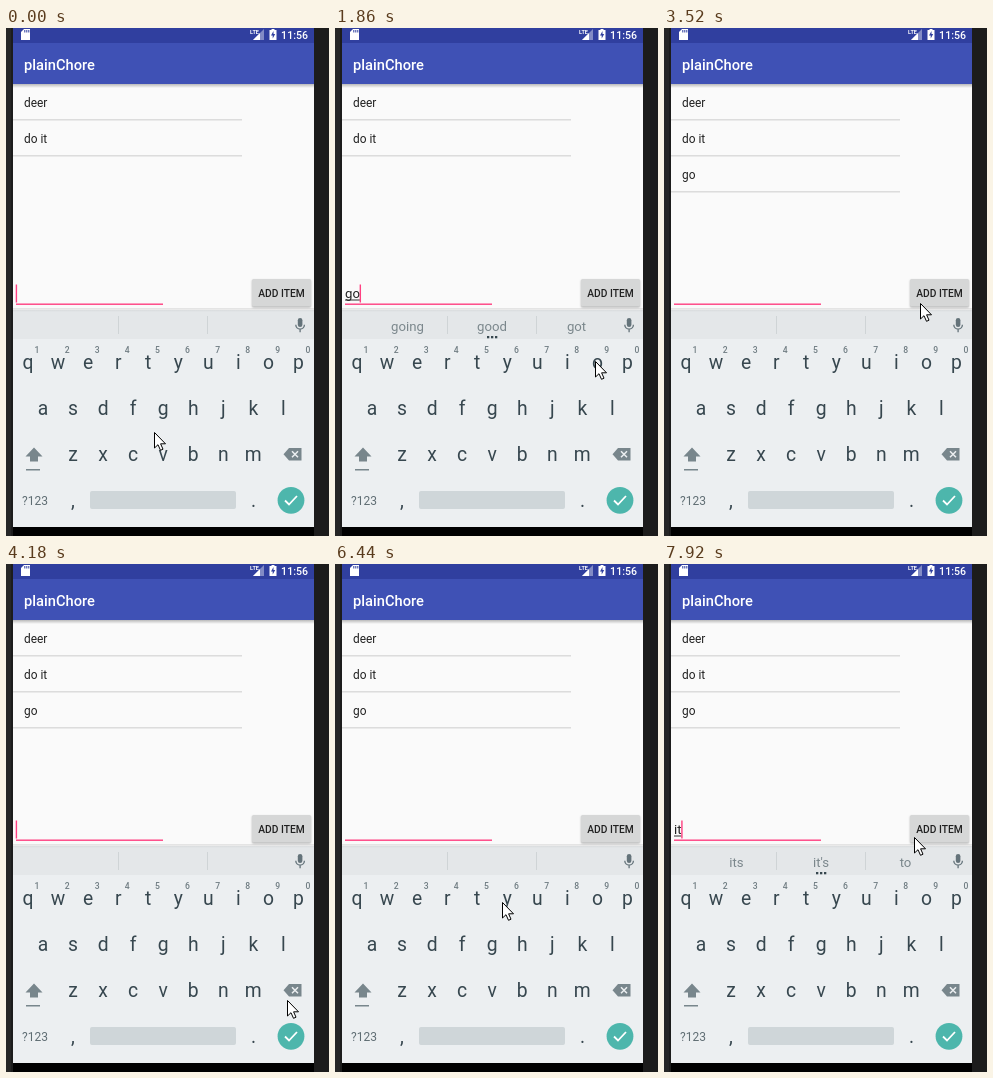
Write an HTML page with a canvas that moves like this. It is 323 by 508 pixels and loops after 8000 ms.

```html
<!DOCTYPE html>
<html lang="en">
<head>
<meta charset="utf-8">
<title>List app</title>
<style>
html, body { margin: 0; width: 100%; height: 100%; overflow: hidden; background: #1c1c1c; }
canvas { display: block; width: 323px; height: 508px; }
</style>
</head>
<body>
<canvas id="stage"></canvas>
<script>
const W = 323, H = 508, LOOP = 8000;
const canvas = document.getElementById('stage');
const ratio = window.devicePixelRatio || 1;
canvas.width = W * ratio;
canvas.height = H * ratio;
const ctx = canvas.getContext('2d');

// Bursts of screen updates: start, end, count
const bursts = [
  [0, 0, 1], [120, 240, 2], [520, 520, 1], [950, 1860, 7], [2010, 2980, 8],
  [3100, 4060, 8], [4180, 4460, 3], [5010, 5910, 8], [6440, 7410, 8], [7530, 7920, 4]
];

// Pointer path: time, x, y
const path = [
  [0, 148, 404], [120, 152, 396], [240, 158, 387], [1250, 158, 387],
  [1710, 267, 337], [1860, 260, 333], [2010, 260, 335], [2840, 258, 272],
  [2980, 257, 275], [3520, 256, 275], [4060, 279, 420], [4460, 285, 473],
  [5009, 285, 473], [5010, 247, 378], [5270, 245, 378], [5910, 168, 344],
  [6440, 167, 338], [6860, 237, 336], [6995, 237, 336], [7260, 174, 333],
  [7410, 143, 332], [7530, 143, 332], [7920, 250, 273]
];

const typing = [[0, ''], [1250, 'g'], [1700, 'go'], [3100, ''], [6990, 'i'], [7530, 'it']];
const hints = [[0, []], [1700, ['going', 'good', 'got']], [3100, []], [7650, ['its', "it's", 'to']]];
const caretOn = [
  [0, true], [520, false], [950, true], [2200, false], [2700, true], [3460, false],
  [3940, true], [4460, false], [5010, true], [5510, false], [5900, true],
  [6440, false], [6950, true]
];

function latest(list, t) {
  let value = list[0][1];
  for (const [at, v] of list) if (at <= t) value = v;
  return value;
}

function snap(t) {
  let last = 0;
  for (const [a, b, n] of bursts) {
    if (t < a) break;
    const gap = n > 1 ? (b - a) / (n - 1) : 0;
    last = gap ? a + gap * Math.min(n - 1, Math.floor((t - a) / gap + 1e-6)) : a;
  }
  return last;
}

function pointerAt(t) {
  for (let i = 1; i < path.length; i++) {
    const [a, x, y] = path[i - 1], [b, u, v] = path[i];
    if (t <= b) {
      const k = (t - a) / (b - a);
      return [Math.round(x + (u - x) * k), Math.round(y + (v - y) * k)];
    }
  }
  return path[path.length - 1].slice(1);
}

function rect(x, y, w, h, color) {
  ctx.fillStyle = color;
  ctx.fillRect(x, y, w, h);
}

function round(x, y, w, h, r, color) {
  ctx.fillStyle = color;
  ctx.beginPath();
  ctx.roundRect(x, y, w, h, r);
  ctx.fill();
}

function disc(x, y, r, color) {
  ctx.fillStyle = color;
  ctx.beginPath();
  ctx.arc(x, y, r, 0, Math.PI * 2);
  ctx.fill();
}

function text(s, x, y, size, color, align = 'left', weight = 400) {
  ctx.font = `${weight} ${size}px Roboto, sans-serif`;
  ctx.fillStyle = color;
  ctx.textAlign = align;
  ctx.fillText(s, x, y);
}

function shape(d, x, y, color) {
  ctx.save();
  ctx.translate(x, y);
  ctx.fillStyle = color;
  ctx.fill(new Path2D(d));
  ctx.restore();
}

function line(d, x, y, color, width) {
  ctx.save();
  ctx.translate(x, y);
  ctx.strokeStyle = color;
  ctx.lineWidth = width;
  ctx.stroke(new Path2D(d));
  ctx.restore();
}

function fade(y, h, alpha) {
  const g = ctx.createLinearGradient(0, y, 0, y + h);
  g.addColorStop(0, `rgba(0,0,0,${alpha})`);
  g.addColorStop(1, 'rgba(0,0,0,0)');
  rect(7, y, 301, h, g);
}

function drawBars() {
  rect(0, 0, W, H, '#1c1c1c');
  rect(0, 0, 5, H, '#262626');
  rect(7, 0, 301, 499, '#fafafa');
  rect(7, 499, 301, 9, '#000');
  rect(7, 0, 301, 15, '#303f9f');
  rect(7, 15, 301, 41, '#3f51b5');
  fade(56, 4, 0.26);
  text('plainChore', 18, 42, 14.7, '#fff', 'left', 500);

  shape('M3 0H9V11H0V3Z', 15, 1, '#fff');
  for (let i = 0; i < 3; i++) rect(18.3 + i * 2, 2, 1, 2.5, '#303f9f');
  text('LTE', 244, 6, 5.5, '#fff', 'left', 700);
  shape('M11 0V11H0Z', 247, 1, 'rgba(255,255,255,.4)');
  shape('M7 4V11H0Z', 247, 1, '#fff');
  shape('M2 0H5V1H7V11H0V1H2Z', 263.5, 1, '#fff');
  shape('M4 2L1.5 6.5H3.2V9.5L5.7 5H4Z', 263.5, 1, '#303f9f');
  text('11:56', 302, 11, 10.6, '#fff', 'right', 500);
}

function drawList(t) {
  const items = t >= 3100 ? ['deer', 'do it', 'go'] : ['deer', 'do it'];
  items.forEach((s, i) => {
    text(s, 18, 78.5 + 36 * i, 11.9, '#212121');
    rect(7, 91 + 36 * i, 229, 1.5, '#dcdcdc');
  });
}

function drawInput(t) {
  const s = latest(typing, t);
  text(s, 10, 270, 13.2, '#212121');
  const w = ctx.measureText(s).width;
  if (s) rect(10, 271.5, w, 1, '#333');
  rect(10, 275.5, 147, 1.4, '#ff4081');
  if (latest(caretOn, t)) rect(9.7 + w, 256.5, 1.4, 18, '#ff4081');

  const pressed = t >= 2960 && t < 3300;
  ctx.save();
  ctx.shadowColor = 'rgba(0,0,0,.3)';
  ctx.shadowBlur = 2 * ratio;
  ctx.shadowOffsetY = ratio;
  round(246, 251, 59, 27.5, 1.5, pressed ? '#c4c5c5' : '#d6d7d7');
  ctx.restore();
  text('ADD ITEM', 275.5, 268.8, 10.26, '#212121', 'center', 500);
}

function drawHints(t) {
  rect(7, 282, 301, 29, '#e4e7e9');
  fade(280, 4, 0.1);
  rect(112, 288, 1, 18, '#cfd4d6');
  rect(201, 288, 1, 18, '#cfd4d6');
  const words = latest(hints, t);
  words.forEach((s, i) => text(s, 72.5 + 84.5 * i, 302.5, 13.2, '#7b878c', 'center'));
  if (words.length) for (let i = 0; i < 3; i++) rect(152 + 4 * i, 308, 2.3, 2.3, '#37474f');

  round(291.8, 290, 4.6, 9, 2.3, '#64737a');
  line('M-4.3 0A4.3 4.3 0 0 0 4.3 0M0 4V7.5', 294.1, 296.8, '#64737a', 1.3);
}

function drawRow(keys, x, y) {
  [...keys].forEach((k, i) => text(k, x + 30.05 * i, y, 19.3, '#37474f', 'center'));
}

function drawKeys() {
  rect(7, 311, 301, 188, '#eceff1');
  drawRow('qwertyuiop', 22, 341);
  drawRow('asdfghjkl', 37, 387);
  drawRow('zxcvbnm', 67, 433);
  [...'1234567890'].forEach((n, i) => text(n, 31 + 30.1 * i, 325, 8.6, '#6f7c82', 'center', 500));

  const grey = '#78868c';
  shape('M8 0L16.5 9H12V14H4V9H-.5Z', 20, 419.5, grey);
  rect(20, 441, 14, 1.5, grey);
  shape('M5.5 0H18V12.5H5.5L0 6.25Z', 277.5, 420, grey);
  line('M0 0L6 6M6 0L0 6', 286, 423.2, '#eceff1', 1.5);

  text('?123', 29, 476.5, 12, '#5f6d73', 'center');
  text(',', 67, 478.5, 19.3, '#37474f', 'center');
  round(84, 463, 146, 18, 2, '#cfd6d9');
  text('.', 247.5, 478.5, 19.3, '#37474f', 'center');
  disc(285, 472.3, 13.4, '#4db6ac');
  line('M0 4.5L4 8.5L12 0', 279, 468, '#fff', 1.8);
}

function drawPointer(t) {
  const [x, y] = pointerAt(t);
  const d = 'M.5 .5V16L4 12.7L6.5 18.3L9 17.2L6.6 11.8H11.5Z';
  shape(d, x, y, '#fff');
  line(d, x, y, '#000', 1);
}

function draw(now) {
  const t = snap(now % LOOP);
  ctx.setTransform(ratio, 0, 0, ratio, 0, 0);
  drawBars();
  drawList(t);
  drawInput(t);
  drawHints(t);
  drawKeys();
  drawPointer(t);
}

let start;
function tick(now) {
  start ??= now;
  draw(now - start);
  requestAnimationFrame(tick);
}
draw(0);
requestAnimationFrame(tick);
</script>
</body>
</html>
```
